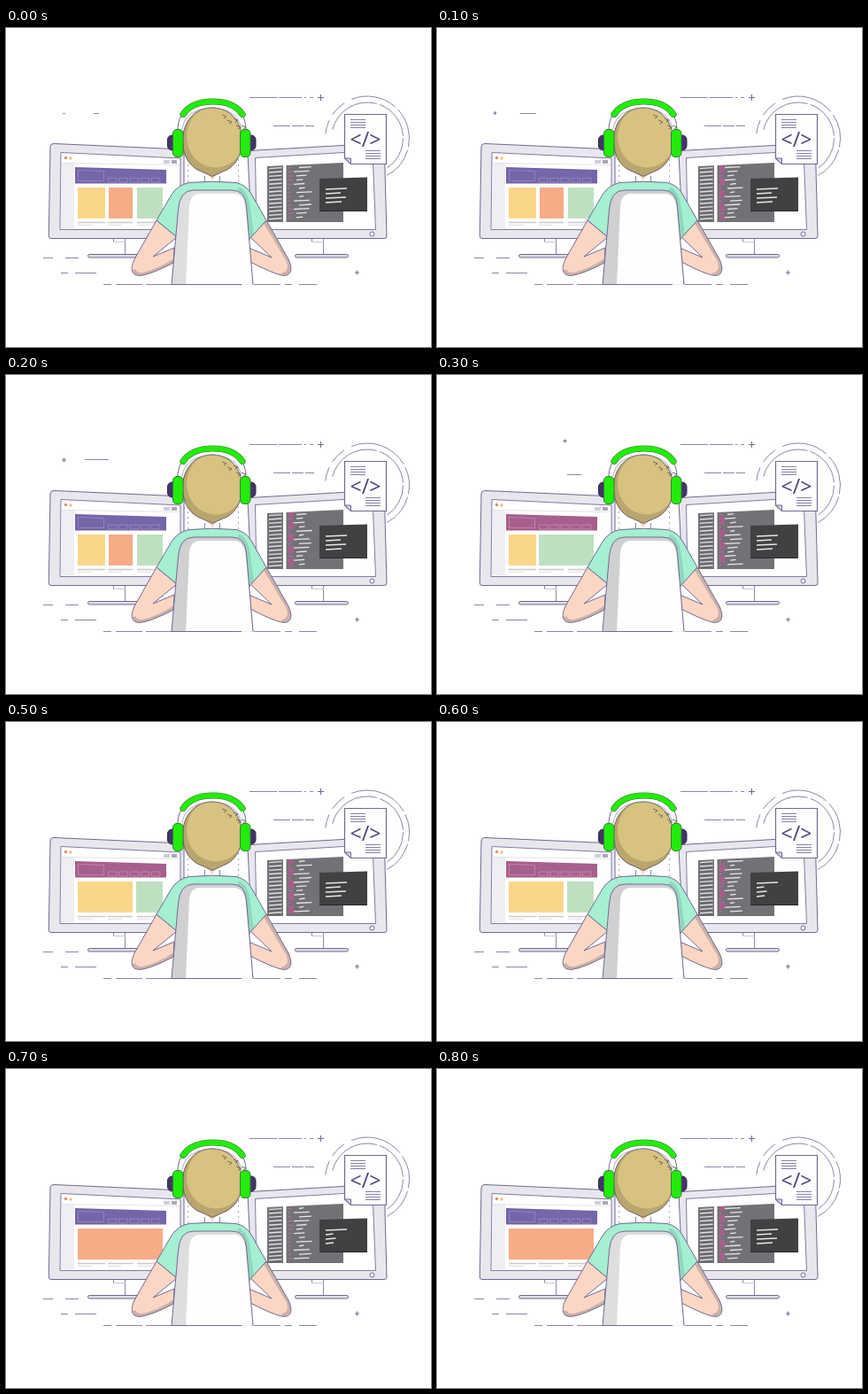
Write an HTML page with a canvas that moves like this. It is 480 by 360 pixels and loops after 900 ms.

```html
<!DOCTYPE html>
<html lang="en">
<head>
<meta charset="utf-8">
<title>Developer at two screens</title>
<style>
html, body { margin: 0; width: 100%; height: 100%; overflow: hidden; background: #fff; }
canvas { display: block; width: 480px; height: 360px; }
</style>
</head>
<body>
<canvas id="stage" width="480" height="360"></canvas>
<script>
const ctx = document.getElementById('stage').getContext('2d');
const LOOP = 900, STEP = 100;
const INK = '#716992', FAINT = '#8c86a6', VIOLET = '#7565a9', MAGENTA = '#a75f8b';
const YELLOW = '#fad68b', ORANGE = '#f7ac87', GREEN = '#bee0c1';
const SKIN = '#fcd6c5', MINT = '#a5efd2', LIME = '#22ec0b';

function paint(path, fill, stroke, width = 1) {
  const p = typeof path === 'string' ? new Path2D(path) : path;
  if (fill) { ctx.fillStyle = fill; ctx.fill(p); }
  if (stroke) { ctx.strokeStyle = stroke; ctx.lineWidth = width; ctx.stroke(p); }
}

function box(x, y, w, h, fill, stroke, r = 0, width = 1) {
  const p = new Path2D();
  p.roundRect(x, y, w, h, r);
  paint(p, fill, stroke, width);
}

function disc(x, y, r, fill, stroke) {
  const p = new Path2D();
  p.arc(x, y, r, 0, Math.PI * 2);
  paint(p, fill, stroke);
}

function line(x1, y1, x2, y2, color = INK, width = 1) {
  paint(`M${x1} ${y1}L${x2} ${y2}`, null, color, width);
}

function dashes(y, ...ends) {
  for (let i = 0; i < ends.length; i += 2) line(ends[i], y, ends[i + 1], y, FAINT);
}

function plus(x, y, r = 3) {
  line(x - r, y, x + r, y);
  line(x, y - r, x, y + r);
}

function clipped(path, draw) {
  ctx.save();
  ctx.clip(new Path2D(path));
  draw();
  ctx.restore();
}

function noise(n) {
  const v = Math.sin(n * 127.1 + 3.7) * 43758.5453;
  return v - Math.floor(v);
}

function backdrop(step) {
  dashes(78.5, 275, 306, 308, 334, 337, 339, 343, 347);
  plus(355.5, 78.5, 3.5);
  dashes(110.5, 302, 321, 323, 336, 338, 348);
  dashes(259.5, 42, 53, 67, 82);
  dashes(276.5, 62, 70, 78, 102);
  dashes(289.5, 110, 119, 124, 154, 158, 187, 280, 310, 315, 323, 331, 351);
  plus(396.5, 276, 2.5);
  plus(277.5, 288, 2);

  if (step === 0) { dashes(96.5, 64, 67, 99, 105); }
  if (step === 1) { plus(65.5, 96, 2); dashes(96.5, 94, 112); }
  if (step === 2) { plus(65.5, 96, 2.5); dashes(95.5, 89, 116); }
  if (step === 3) { plus(144.5, 74.5, 2); dashes(112.5, 147, 163); }
  if (step === 4) {
    plus(144.5, 74.5, 2.5);
    dashes(74.5, 168, 177);
    dashes(112.5, 141, 153, 155, 168);
  }
}

function ring(step) {
  const arc = (r, from, to) => {
    const p = new Path2D();
    p.arc(408, 124.5, r, from * Math.PI / 180, to * Math.PI / 180);
    paint(p, null, FAINT, 1);
  };
  const gap = -48 + (step % 3) * 9;
  arc(47.5, -112, gap);
  arc(47.5, gap + 5, 12);
  arc(47.5, 16, 62);
  arc(47.5, 186, 205);
  arc(47.5, 214, 237);
  arc(40.5, 194, 286);
  arc(40.5, 290, 356);
  arc(40.5, 0, 56);
}

function stand(x, base) {
  line(x + 0.5, 238, x + 0.5, 242, FAINT);
  line(x + 13.5, 238, x + 13.5, 255, FAINT);
  line(x, 241.5, x + 14, 241.5, '#cbc9d5');
  box(base, 255.5, 60, 3.5, '#dedde5', INK, 2);
}

function leftScreen(step) {
  stand(121, 92.5);
  paint('M54 130.5L201 137V237.5H51Q48 237.5 48.3 234L50 134Q50.2 130.5 54 130.5Z', '#e8e7ed', INK);
  paint('M62 140.5L197 147V227.5H61Z', '#fff', '#837ba3');
  paint('M63 152H77V226.5H62Z', '#efeef2');
  line(63, 152.5, 196, 154.5, '#e4e3e9');
  disc(67.5, 146.5, 1.7, '#e98775');
  disc(73, 147, 1.7, '#f0c26e');
  box(178, 149, 7, 4, '#d0ced8');
  box(187, 149, 6, 4, '#aaa7b7');

  const pink = step > 2 && step < 7;
  paint('M78 157L181 160V175.5H78Z', pink ? MAGENTA : VIOLET);
  const edge = pink ? '#c58faf' : '#9a8ec4';
  paint('M81.5 160.5L110.5 161.5V172.5H81.5Z', null, edge, 0.8);
  for (let i = 0; i < 5; i++) box(115.5 + i * 12.2, 169, 9.5, 5, null, edge, 0, 0.8);

  let cards;
  if (step < 3) cards = [[81, 31, YELLOW], [116, 27, ORANGE], [148, 29, GREEN]];
  else if (step < 5) cards = [[81, 31, YELLOW], [115, 62, GREEN]];
  else if (step < 7) cards = [[81, 62, YELLOW], [147, 30, GREEN]];
  else cards = [[81, 96, ORANGE]];
  for (const [x, w, color] of cards) box(x, 180, w, 35, color);
  for (const [x, w] of [[81, 31], [115, 28], [148, 29]]) {
    line(x, 219.5, x + w, 219.5, '#c9c8ce', 1.5);
    line(x, 222.3, x + w * 0.55, 222.3, '#dddce1');
  }
}

function editor(step) {
  paint('M295 156L381 152V219H295Z', '#727276');
  paint('M313 154L316.5 154V219.5H313Z', '#fff');
  for (let y = 158; y < 218; y += 4.4) {
    line(297, y + 0.6, 311.5, y - 0.4, '#dfdfe3', 1.4);
    line(298, y + 2.4, 310, y + 1.6, '#58585d', 0.7);
  }
  const solid = step > 0 && step !== 7;
  for (let i = 0; i < 13; i++) {
    const row = (i + step) % 9, y = 157.5 + i * 4.7;
    if (solid && row % 3) box(319, y - 2.5, 6, 4.8, MAGENTA);
    else line(319, y, 321 + noise(row) * 4, y, '#b0709a', 1.4);
    const x = 325 + Math.floor(noise(row + 20) * 3) * 3;
    const end = x + 5 + noise(row + 40) * 15;
    line(x, y, end, y - 0.8, '#e6e5ea', 1.3);
  }

  paint('M354 170L408 168.5V207H354Z', '#414143');
  line(354, 206.5, 408, 206.5, '#29292c');
  const typed = [24, 17, 23, 18];
  typed.forEach((w, i) => {
    const len = step > 5 && step < 8 && i > 0 ? w * 0.5 : w;
    line(361, 182 + i * 5, 361 + len, 181 + i * 5, '#e7e7e9', 1.3);
  });
}

function rightScreen(step) {
  stand(345, 326.5);
  paint('M275 138.5L424 130Q427 130 427.3 134L430 235Q430 237.5 427 237.5H281Q278 237.5 277.7 235L273 142Q273 139 275 138.5Z', '#e8e7ed', INK);
  paint('M281.5 146.5L414 138.5L417.5 227.5H283Z', '#fff', '#837ba3');
  disc(413.5, 232.5, 2.5, '#f6f5f9', INK);
  editor(step);
}

function codeSheet() {
  paint('M382.5 97.5H429.5V153.5H389.5L382.5 147Z', '#fefeff', INK, 1.2);
  paint('M382.5 147H389.5V153.5Z', '#d4d0e4', INK);
  for (let i = 0; i < 4; i++) {
    line(389, 103.5 + i * 3, 406, 103.5 + i * 3, '#877fac');
    line(406, 138.5 + i * 3, 423, 138.5 + i * 3, '#877fac');
  }
  ctx.fillStyle = '#51477f';
  ctx.font = '23px "Noto Sans", sans-serif';
  ctx.textAlign = 'center';
  ctx.fillText('</>', 406, 133.5);
}

function arm(path, shade) {
  paint(path, SKIN);
  clipped(path, () => paint(shade, null, '#cbb2a9', 7));
  paint(path, null, INK);
}

function person() {
  arm('M170 217L145 261C139 274 143 281 154 279Q166 277 189 265L190 248L166 258L193 236Z',
      'M143 273Q145 281 157 279Q173 275 190 264');
  arm('M294 217L319 261C325 274 321 281 311 279Q299 276 276 264L274 248L300 259L276 236Z',
      'M293 217L320 262Q325 276 312 280');

  ctx.setLineDash([2, 4]);
  line(205.5, 148, 205.5, 174, '#aaa5bd');
  line(262.5, 148, 262.5, 174, '#aaa5bd');
  ctx.setLineDash([]);
  paint('M227 164H239L233 172Z', SKIN);
  line(224.5, 167, 224.5, 173, FAINT);
  line(241.5, 167, 241.5, 173, FAINT);

  const shirt = 'M207 174.5Q233 172 260 174.5Q271 177 277 187L294 217L276 237L268 250H198L193 236L170 217L187 188Q194 177 207 174.5Z';
  paint(shirt, MINT);
  clipped(shirt, () => paint('M262 182Q270 184 273 200L278 238', null, '#92d6bd', 5));
  paint(shirt, null, INK);
}

function chair(step) {
  const bright = step === 0 || step > 6;
  const outline = 'M187 289.5L194.5 205Q196 183 212 183H255Q270 183 271.5 201L279 289.5';
  paint(outline, bright ? '#dededf' : '#d0d0d3');
  clipped(outline, () => paint(
    'M219 187H257Q269 187 270.5 203L279 290H203L207 201Q208 187 219 187Z', '#fefefe'));
  paint(outline, null, INK);
  line(187, 289.5, 266, 289.5);
}

function head() {
  const skull = 'M233 90C253 90 266.5 106 266.5 127C266.5 146 257 158 245 162L233 167.5L221 162C209 158 199.5 146 199.5 127C199.5 106 213 90 233 90Z';
  paint(skull, '#b9a56e');
  clipped(skull, () => {
    const light = new Path2D();
    light.ellipse(237, 122.5, 33, 35, 0, 0, Math.PI * 2);
    paint(light, '#d8c280');
  });
  paint(skull, null, '#6c6269');
  for (const [x, y] of [[246, 100], [252, 106], [259, 104], [262, 112], [268, 112]]) {
    paint(`M${x - 2} ${y - 2}L${x + 3} ${y}L${x} ${y + 2}`, null, '#756a5c');
  }

  paint('M194 115C194 96 207 83 233 82C259 83 271 96 271 115', null, INK, 1);
  paint('M199 114C201 99 214 91 233 90C252 91 263 99 266 114', null, '#928ba9', 0.8);
  ctx.lineCap = 'round';
  const band = 'M200 97.5C207 87 219 83 234 83C249 83 260 87 267 97.5';
  paint(band, null, '#437042', 7.2);
  paint(band, null, LIME, 6);
  ctx.lineCap = 'butt';
  box(182.5, 121, 10, 17, '#443468', '#37295a', 5);
  box(272, 121, 10, 17, '#443468', '#37295a', 5);
  box(188.5, 114.5, 11.5, 31, LIME, '#377c38', 4.5);
  box(264.5, 114.5, 11.5, 31, LIME, '#377c38', 4.5);
}

function draw(now) {
  const step = Math.floor((now % LOOP) / STEP);
  ctx.fillStyle = '#fff';
  ctx.fillRect(0, 0, 480, 360);
  backdrop(step);
  ring(step);
  leftScreen(step);
  rightScreen(step);
  codeSheet();
  person();
  chair(step);
  head();
}

const start = performance.now();
function tick() {
  draw(performance.now() - start);
  requestAnimationFrame(tick);
}
tick();
</script>
</body>
</html>
```
